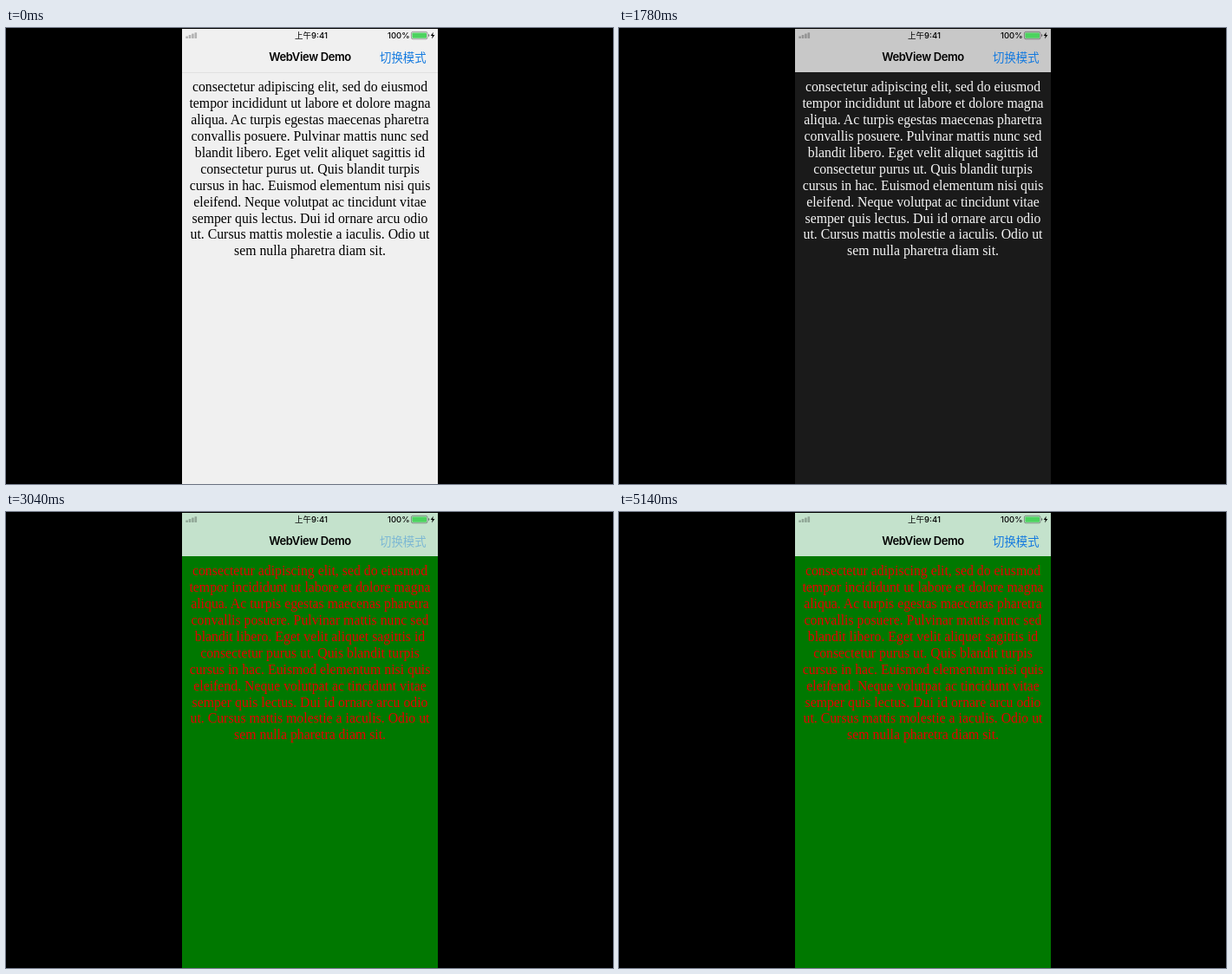
Write an HTML page that moves like this. It is 700 by 526 pixels and loops after 7.28 s.

```html
<!DOCTYPE html>
<html lang="zh">
<head>
<meta charset="utf-8">
<title>WebView Demo</title>
<style>
html, body { margin: 0; width: 100%; height: 100%; overflow: hidden; background: #000; }
svg { display: block; width: 700px; height: 526px; }
text { font-family: Inter, "Noto Sans CJK SC", "Noto Sans CJK", sans-serif; }
#page { fill: var(--page); }
#bar { fill: var(--bar); }
#line { fill: var(--line); }
#copy text { font: 15.8px "Liberation Serif", "Times New Roman", serif; fill: var(--ink); text-anchor: middle; }
.status { font-size: 9.5px; font-weight: 500; }
#title { font-size: 13px; font-weight: 600; letter-spacing: -.35px; text-anchor: middle; }
#toggle { font-family: "Noto Sans CJK SC", "Noto Sans CJK", sans-serif; font-size: 13.4px; fill: #147adf; }
</style>
</head>
<body>
<svg viewBox="0 0 700 526">
  <rect width="700" height="526"/>
  <rect id="page" x="203" y="1" width="295" height="525"/>
  <rect id="bar" x="203" y="1" width="295" height="50"/>
  <rect id="line" x="203" y="51" width="295" height="1"/>
  <g id="signal" fill-opacity=".26"></g>
  <text class="status" x="352" y="12.2" text-anchor="middle">上午9:41</text>
  <text class="status" x="440" y="12.2">100%</text>
  <rect x="467.4" y="4.4" width="18.6" height="8.4" rx="1.8" fill="none" stroke="#000" stroke-opacity=".45" stroke-width=".8"/>
  <rect x="468.4" y="5.4" width="16.6" height="6.4" rx=".8" fill="#4cd35f"/>
  <path d="M487 7.1q1.3 .2 1.3 1.5t-1.3 1.5z" fill-opacity=".5"/>
  <path d="M492.8 4.8l-3.1 4.3h2.1l-.8 3.3 3.4-4.5h-2.2z"/>
  <text id="title" x="350.6" y="38.3">WebView Demo</text>
  <text id="toggle" x="431" y="38.6">切换模式</text>
  <g id="copy"></g>
</svg>
<script>
const LOOP = 7280;
const copy = [
  "consectetur adipiscing elit, sed do eiusmod",
  "tempor incididunt ut labore et dolore magna",
  "aliqua. Ac turpis egestas maecenas pharetra",
  "convallis posuere. Pulvinar mattis nunc sed",
  "blandit libero. Eget velit aliquet sagittis id",
  "consectetur purus ut. Quis blandit turpis",
  "cursus in hac. Euismod elementum nisi quis",
  "eleifend. Neque volutpat ac tincidunt vitae",
  "semper quis lectus. Dui id ornare arcu odio",
  "ut. Cursus mattis molestie a iaculis. Odio ut",
  "sem nulla pharetra diam sit."
];
const themes = {
  light: { page: "#f0f0f0", bar: "#f0f0f0", line: "#e1e1e1", ink: "#000" },
  dark: { page: "#1a1a1a", bar: "#c8c8c8", line: "#1a1a1a", ink: "#f5f5f5" },
  green: { page: "#007800", bar: "#c4e2cc", line: "#007800", ink: "#e60000" }
};
// [start time, theme, button opacity]
const steps = [
  [0, "light", 1],
  [1780, "dark", 1],
  [2760, "dark", .92],
  [2900, "dark", .72],
  [3040, "green", .4],
  [3180, "green", .62],
  [3320, "green", .8],
  [3460, "green", .93],
  [3600, "green", 1]
];

const byId = id => document.getElementById(id);
function add(parent, tag, attrs, text = "") {
  const node = document.createElementNS("http://www.w3.org/2000/svg", tag);
  for (const key in attrs) node.setAttribute(key, attrs[key]);
  node.textContent = text;
  byId(parent).append(node);
}

copy.forEach((line, i) => add("copy", "text", { x: 350.5, y: 73.3 + i * 18.9 }, line));
for (let i = 0; i < 4; i++) {
  const height = 2.6 + i * 1.4;
  add("signal", "rect", { x: 207.3 + i * 3.4, y: 12 - height, width: 2.6, height, rx: .4 });
}

let shown;
function show(step) {
  if (step === shown) return;
  shown = step;
  const [, theme, alpha] = step;
  for (const key in themes[theme]) {
    document.documentElement.style.setProperty("--" + key, themes[theme][key]);
  }
  byId("toggle").style.opacity = alpha;
}

const start = performance.now();
function tick() {
  const t = (performance.now() - start) % LOOP;
  show(steps.filter(step => step[0] <= t).pop());
  requestAnimationFrame(tick);
}
tick();
</script>
</body>
</html>
```
